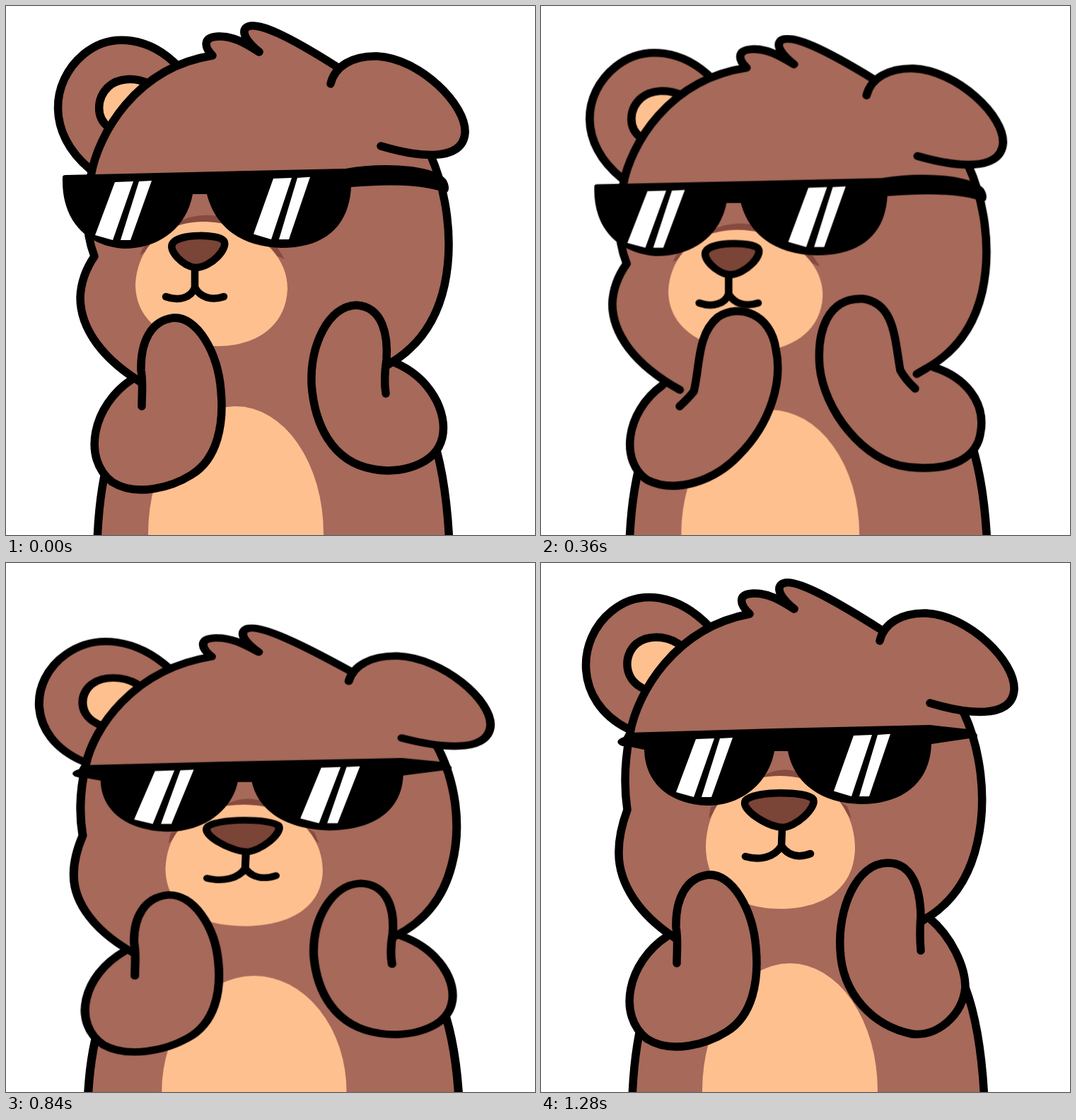
Write an HTML page without scripts that moves like this. It is 748 by 748 pixels and loops after 1.32 s.

```html
<!DOCTYPE html>
<html lang="en">
<head>
<meta charset="utf-8">
<title>Cool bear</title>
<style>
html, body { margin: 0; height: 100%; overflow: hidden; background: #fff; }
svg { display: block; width: 100vw; height: 100vh; }

.line { fill: none; stroke: #000; stroke-width: 11.5; stroke-linecap: round; stroke-linejoin: round; }
.fur { fill: #a6695a; }
.cream { fill: #ffc08f; }
.shade { fill: #864a3f; }
.nose { fill: #7a4437; }
.thin { stroke-width: 10.5; }
.white { fill: #fff; }

/* --k is the squash; --a, --b, --c show one arm pose each */
.bear {
  --k: 0; --a: 1; --b: 0; --c: 0;
  transform-origin: 374px 770px;
  transform: scale(calc(1 + var(--k)), calc(1 - 1.6 * var(--k)));
  animation: beat 1320ms -800ms step-end infinite;
}
.open { opacity: calc(var(--a) + var(--b)); }
.mid { opacity: var(--a); }
.wide { opacity: var(--b); }
.clap { opacity: var(--c); transform-origin: 374px 770px; transform: scale(.9847, 1.0254); }
.side { animation: first-half 1320ms step-end infinite; }
.front { animation: second-half 1320ms step-end infinite; }

/* four bounces of eight drawings, with one drawing held twice */
@keyframes beat {
  0%, 24.24%, 48.48%, 72.72%, 96.96% { --k: .054; --a: 1; --b: 0; --c: 0; }
  3.03%, 27.27%, 51.51%, 75.75% { --k: .031; --a: 0; --b: 1; --c: 0; }
  6.06%, 30.3%, 54.54%, 78.78% { --k: .0095; --a: 0; --b: 1; --c: 0; }
  9.09%, 33.33%, 57.57%, 81.81% { --k: 0; --a: 0; --b: 1; --c: 0; }
  12.12%, 36.36%, 60.6%, 84.84% { --k: 0; --a: 1; --b: 0; --c: 0; }
  15.15%, 39.39%, 63.63%, 87.87% { --k: .0155; --a: 0; --b: 0; --c: 1; }
  18.18%, 42.42%, 66.66%, 90.9% { --k: .045; --a: 0; --b: 0; --c: 1; }
  21.21%, 45.45%, 69.69%, 93.93% { --k: .065; --a: 0; --b: 0; --c: 1; }
  100% { --k: .054; --a: 1; --b: 0; --c: 0; }
}
@keyframes first-half { 0% { opacity: 1; } 51.51%, 100% { opacity: 0; } }
@keyframes second-half { 0% { opacity: 0; } 51.51%, 100% { opacity: 1; } }
</style>
</head>
<body>
<svg viewBox="0 0 748 748">
  <defs>
    <g id="shine" class="white">
      <path d="M154 249L180 248L151 331L126 324Z"/>
      <path d="M188 248L206 247L176 331L162 331Z"/>
    </g>
    <path id="ear" class="line fur" d="M459 110C465 85 490 70 525 71C585 74 652 140 649 180C645 222 580 213 530 198"/>
  </defs>

  <g class="bear">
    <path class="fur" d="M128 790C130 720 134 680 142 650L190 480H535L552 512L600 600C615 640 626 700 628 790Z"/>
    <path class="line" d="M128 790C129 730 133 690 142 650M600 600C615 640 626 700 628 790"/>

    <g class="side">
      <ellipse class="cream" cx="325" cy="746" rx="124" ry="180"/>
      <path class="line fur" d="M244 86C205 45 150 35 110 68C62 108 58 180 118 230"/>
      <path class="line cream" d="M202 110C182 100 158 102 145 114C128 130 126 158 146 172"/>
      <path class="line fur" d="M199 537C135 500 105 455 105 412C106 388 114 370 125 354C112 320 112 280 120 240C130 182 183 87 292 70C280 58 278 44 300 43C322 42 340 54 358 65C340 50 333 38 339 31C352 18 405 46 468 86L600 210C622 260 634 330 620 395C610 440 587 480 542 506L529 514"/>
      <use href="#ear"/>
      <path class="shade" d="M240 307Q270 291 304 298L306 310H240ZM370 338L384 342L394 358L380 352ZM189 352L196 338L210 336L200 346Z"/>
      <path class="cream" d="M183 395C184 355 210 306 278 305C343 305 398 345 398 400C396 455 350 481 300 481C235 480 184 450 183 395Z"/>
      <path d="M80 242Q80 239 84 239L260 235L480 230Q525 222 573 227Q610 232 622 245Q628 255 625 262Q620 268 612 261Q570 249 488 256C485 312 450 342 390 342C330 341 295 310 284 266H264C255 315 215 344 165 343C110 338 78 300 80 242Z"/>
      <use href="#shine"/>
      <use href="#shine" transform="translate(224 -17) scale(1 1.048)"/>
      <path class="line thin nose" d="M236 335C245 322 300 322 308 332C315 342 290 370 268 370C250 368 228 345 236 335Z"/>
      <path class="line thin" d="M267 370V398M226 411C245 418 262 412 267 398C275 412 290 417 308 411"/>
    </g>

    <g class="front">
      <ellipse class="cream" cx="352" cy="746" rx="124" ry="180"/>
      <path class="line fur" d="M238 90C195 45 140 35 100 68C50 108 46 195 122 234"/>
      <path class="line cream" d="M194 114C175 102 150 102 135 114C116 130 116 165 146 178"/>
      <path class="line fur" d="M199 536C138 500 109 452 110 408C110 386 115 368 122 349C117 315 118 280 126 240C136 185 188 92 295 72C280 58 278 44 300 43C322 42 340 54 358 65C340 50 333 38 339 31C352 18 405 46 482 95L598 212C620 260 632 330 617 395C607 440 584 480 542 504L529 514"/>
      <use href="#ear" x="20"/>
      <path class="shade" d="M310 303Q340 285 366 297V308H310ZM424 338L433 344L439 361L430 352ZM237 361L240 345L252 341L246 352Z"/>
      <path class="cream" d="M233 400C235 340 270 302 338 301C410 302 444 350 444 405C442 460 400 489 338 489C270 488 233 455 233 400Z"/>
      <path d="M109 255Q106 250 117 246L120 240L330 234L550 229L604 235Q618 240 617 245Q615 251 606 248L552 256C550 312 510 341 452 341C390 339 357 307 349 266H330C322 310 285 343 235 343C180 341 147 310 146 264L122 259Q112 260 109 255Z"/>
      <use href="#shine" x="65"/>
      <use href="#shine" transform="translate(288 -17) scale(1 1.048)"/>
      <path class="line thin nose" d="M289 336C300 322 375 322 385 334C390 346 360 374 341 374C318 372 282 348 289 336Z"/>
      <path class="line thin" d="M341 374L340 400M289 415C310 421 330 416 340 400C350 415 365 417 381 411"/>
    </g>

    <path class="line fur open" d="M178 528C122 565 107 640 150 673C185 695 235 680 262 663C300 640 308 590 304 545C300 490 270 438 236 441C205 445 190 475 191 515C194 535 192 548 192 566"/>
    <path class="line fur mid" d="M549 504C600 525 625 575 617 610C608 650 555 662 520 655C460 645 436 590 432 535C430 480 455 425 495 423C535 425 540 470 538 500C535 520 535 535 537 548"/>
    <path class="line fur wide" d="M549 502C580 528 600 570 600 600C596 640 560 670 525 666C470 655 425 610 423 545C420 490 445 425 490 424C525 424 536 460 537 498Q535 525 537 548"/>
    <g class="clap">
      <path class="line fur" d="M172 536C118 575 112 645 150 670C190 690 245 672 280 635C325 590 342 530 332 485C325 435 280 420 250 440C220 465 225 510 216 545Q208 555 196 566"/>
      <path class="line fur" d="M556 511C600 525 628 560 622 600C618 640 580 658 520 652C455 645 400 570 394 510C390 460 405 412 455 414C500 420 500 470 508 515Q515 528 529 541"/>
    </g>
  </g>
</svg>
</body>
</html>
```
